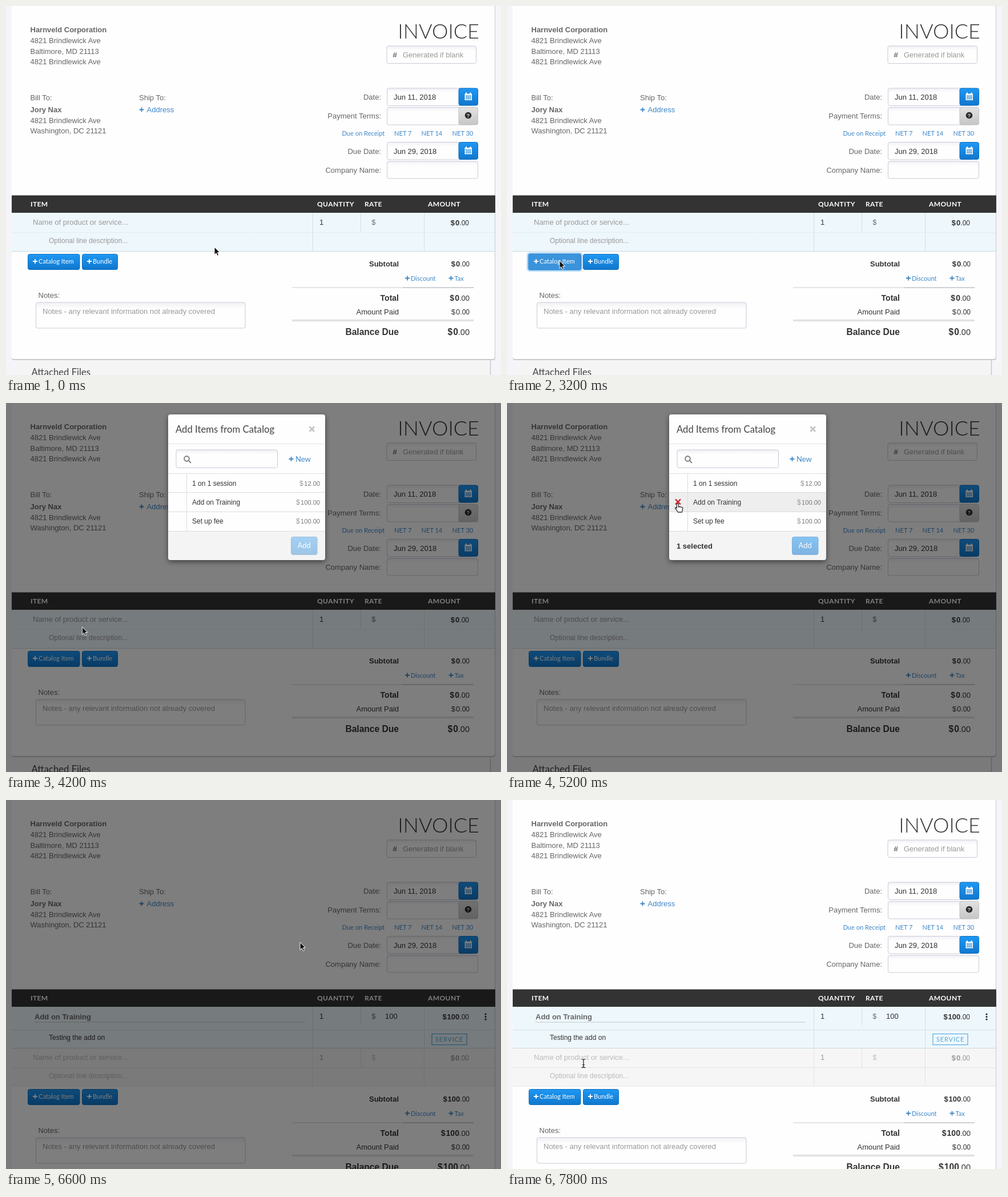
Recreate the animation shown at these times as an HTML page. Size 867 by 646 pixels, loop 8000 ms.

```html
<!DOCTYPE html>
<html lang="en">
<head>
<meta charset="utf-8">
<title>Invoice</title>
<style>
html, body { margin: 0; height: 100%; overflow: hidden; background: #f5f5f9; }
svg { display: block; width: 100%; height: 100%; }
text { font: 13px "Liberation Sans", Arial, sans-serif; fill: #666; white-space: pre; }
.lato, .link, .head, .title { font-family: Lato, sans-serif; }
.b { font-weight: 700; }
.s { font-size: 12px; }
.end { text-anchor: end; }
.dark { fill: #333; }
.hint { fill: #999; }
.faint { fill: #bbb; }
.link { font-size: 11.1px; fill: #3f87c9; }
.head { font-size: 12px; font-weight: 700; letter-spacing: .4px; fill: #fff; }
.title { font-size: 16.7px; fill: #444; }
.white { fill: #fff; }
.field { fill: url(#inset); stroke: #c9cbd8; }
.btn { fill: url(#blue); stroke: #0f70c0; }
.plus { fill: none; stroke: #3f87c9; stroke-width: 1.8; }
.onblue { stroke: #fff; }
.rule { fill: none; stroke: #d3e1e8; }
.grey { stroke: #e3e3e3; }

/* One frame lasts 200 ms, which is 2.5% of the loop. */
.before, .after, .lower, .backdrop, .modal, .foot, .loading, .loaded, .hover, .picked,
.enable, .focus, .cursor, .arrow, .beam, .hand, .spin {
  animation: 8s step-end -4ms infinite;
}
.before { animation-name: before; }
.after { animation-name: after; }
.lower { animation-name: lower; }
.backdrop { animation-name: backdrop; }
.modal { animation-name: modal; filter: drop-shadow(0 3px 5px rgba(0,0,0,.5)); }
.foot { animation-name: foot; }
.loading { animation-name: loading; }
.loaded { animation-name: loaded; }
.hover { animation-name: hover; }
.picked { animation-name: picked; }
.enable { animation-name: enable; }
.focus { animation-name: focus; }
.cursor { animation-name: cursor; }
.arrow { animation-name: arrow; }
.beam { animation-name: beam; }
.hand { animation-name: hand; }
.spin { animation: spin 1s steps(5) -4ms infinite; }

@keyframes before { 0% { opacity: 1 } 80%, 100% { opacity: 0 } }
@keyframes after { 0% { opacity: 0 } 80%, 100% { opacity: 1 } }
@keyframes lower { 0% { transform: none } 80%, 100% { transform: translateY(72px) } }
@keyframes backdrop { 0% { opacity: 0 } 42.5% { opacity: .5 } 85%, 100% { opacity: 0 } }
@keyframes modal {
  0% { opacity: 0; transform: translateY(-5px) }
  42.5% { opacity: 1; transform: translateY(-5px) }
  45% { opacity: 1; transform: none }
  80% { opacity: .4; transform: translateY(-25px) }
  82.5%, 100% { opacity: 0; transform: none }
}
@keyframes foot { 0% { transform: translateY(42px) } 50%, 100% { transform: none } }
@keyframes loading { 0% { opacity: 1 } 50%, 100% { opacity: 0 } }
@keyframes loaded { 0% { opacity: 0 } 50%, 100% { opacity: 1 } }
@keyframes hover { 0% { opacity: 0 } 62.5%, 100% { opacity: 1 } }
@keyframes picked { 0% { opacity: 0 } 65%, 100% { opacity: 1 } }
@keyframes enable { 0% { opacity: .38 } 65% { opacity: .52 } 67.5%, 100% { opacity: 1 } }
@keyframes focus { 0% { opacity: 0 } 40% { opacity: 1 } 42.5%, 100% { opacity: 0 } }
@keyframes cursor {
  0% { transform: translate(365px, 422px) }
  5% { transform: translate(365px, 422px); animation-timing-function: steps(6) }
  20% { transform: translate(99px, 389px) }
  22.5% { transform: translate(99px, 389px); animation-timing-function: steps(4) }
  32.5% { transform: translate(92px, 446px) }
  50% { transform: translate(92px, 446px); animation-timing-function: steps(5) }
  62.5% { transform: translate(299px, 176px) }
  65% { transform: translate(299px, 176px); animation-timing-function: steps(4) }
  75% { transform: translate(515px, 249px) }
  82.5% { transform: translate(515px, 249px); animation-timing-function: steps(5) }
  95%, 100% { transform: translate(134px, 461px) }
}
@keyframes arrow {
  0% { opacity: 1 } 10% { opacity: 0 } 27.5% { opacity: 1 }
  62.5% { opacity: 0 } 80% { opacity: 1 } 90%, 100% { opacity: 0 }
}
@keyframes beam { 0% { opacity: 0 } 10% { opacity: 1 } 27.5% { opacity: 0 } 90%, 100% { opacity: 1 } }
@keyframes hand { 0% { opacity: 0 } 62.5% { opacity: 1 } 80%, 100% { opacity: 0 } }
@keyframes spin { to { transform: rotate(360deg) } }
</style>
</head>
<body>
<svg viewBox="0 0 867 646">
<defs>
  <linearGradient id="blue" x2="0" y2="1"><stop stop-color="#1f98f4"/><stop offset="1" stop-color="#1077cd"/></linearGradient>
  <linearGradient id="silver" x2="0" y2="1"><stop stop-color="#e2e2e2"/><stop offset="1" stop-color="#c6c6c6"/></linearGradient>
  <linearGradient id="inset" x2="0" y2="1"><stop stop-color="#f1f1f6"/><stop offset=".25" stop-color="#fefefe"/></linearGradient>
  <filter id="glow" x="-20%" y="-40%" width="140%" height="180%"><feGaussianBlur stdDeviation="1.5"/></filter>
  <path id="plus" d="M0 0h8M4-4v8"/>
  <g id="calendar">
    <rect x="793" y=".5" width="33.5" height="30" rx="3" class="btn"/>
    <path d="M803.5 10h12.5v11.5h-12.5z" fill="#fff"/>
    <path d="M806 8v3M813.5 8v3" stroke="#fff" stroke-width="2"/>
    <path d="M804.500 13.500h10.500M804.500 16h10.500M804.500 18.500h10.500M807 13v8M810 13v8M813 13v8" stroke="#1684dc" stroke-width=".8"/>
  </g>
</defs>

<!-- Sheet and everything pushed down by a new item -->
<g class="lower">
  <path d="M19 600h829v60H19z" fill="#f5f5f6"/>
  <path d="M848.500 618v60" stroke="#c8c8cc" stroke-width="1.500"/>
  <text x="44.500" y="647" class="title">Attached Files</text>
  <rect x="10" y="-80" width="847" height="700" rx="4" fill="#c9c9cf"/>
  <rect x="10" y="-80" width="846" height="698" rx="4" fill="#fefefe"/>

  <rect class="focus" x="36" y="432.500" width="95" height="31" rx="4" fill="#4aa5ee" filter="url(#glow)"/>
  <rect x="38.500" y="434.500" width="90.500" height="27" rx="3" class="btn"/>
  <rect class="focus" x="38.500" y="434.500" width="90.500" height="27" rx="3" fill="#3b93db" stroke="#2d84cc"/>
  <use href="#plus" x="47" y="447" class="plus onblue"/>
  <text x="57" y="451" class="link white">Catalog Item</text>
  <rect x="133.500" y="434.500" width="62" height="27" rx="3" class="btn"/>
  <use href="#plus" x="142" y="447" class="plus onblue"/>
  <text x="152" y="451" class="link white">Bundle</text>

  <text x="56.500" y="511">Notes:</text>
  <rect x="52.500" y="519" width="366.500" height="45" rx="3" class="field"/>
  <text x="64" y="539" class="hint">Notes - any relevant information not already covered</text>

  <text x="688" y="455.500" class="b dark end">Subtotal</text>
  <use href="#plus" x="699" y="476.500" class="plus"/><text x="709" y="480.500" class="link">Discount</text>
  <use href="#plus" x="775.500" y="476.500" class="plus"/><text x="785.500" y="480.500" class="link">Tax</text>
  <path d="M501 493h194" stroke="#ddd" stroke-width="1.500"/>
  <path d="M695 493h124" stroke="#bfc0c6" stroke-width="1.500"/>
  <text x="688" y="516" class="b dark end" style="font-size:14px">Total</text>
  <text x="688" y="540" class="dark end">Amount Paid</text>
  <path d="M501 550.500h318" stroke="#e2e2e2" stroke-width="3.500"/>
  <text x="688" y="576" class="b dark end" style="font-size:15.600px">Balance Due</text>
  <text x="812" y="540" class="dark end">$<tspan dx="1">0</tspan><tspan class="s">.00</tspan></text>
  <g class="before">
    <text x="812" y="455.500" class="dark end"><tspan class="b">$</tspan><tspan class="b" dx="1">0</tspan><tspan class="s">.00</tspan></text>
    <text x="812" y="516" class="dark end" style="font-size:14px"><tspan class="b">$</tspan><tspan class="b" dx="1">0</tspan><tspan style="font-size:13px">.00</tspan></text>
    <text x="812" y="576" class="dark end" style="font-size:15.600px"><tspan class="b">$</tspan><tspan class="b" dx="1">0</tspan><tspan style="font-size:14.500px">.00</tspan></text>
  </g>
  <g class="after">
    <text x="812" y="455.500" class="dark end"><tspan class="b">$</tspan><tspan class="b" dx="1">100</tspan><tspan class="s">.00</tspan></text>
    <text x="812" y="516" class="dark end" style="font-size:14px"><tspan class="b">$</tspan><tspan class="b" dx="1">100</tspan><tspan style="font-size:13px">.00</tspan></text>
    <text x="812" y="576" class="dark end" style="font-size:15.600px"><tspan class="b">$</tspan><tspan class="b" dx="1">100</tspan><tspan style="font-size:14.500px">.00</tspan></text>
  </g>
</g>

<!-- Addresses -->
<text x="42.500" y="46" class="b">Harnveld Corporation</text>
<text x="42.500" y="65">4821 Brindlewick Ave</text>
<text x="42.500" y="83.500">Baltimore, MD 21113</text>
<text x="42.500" y="102">4821 Brindlewick Ave</text>
<text x="42.500" y="164.500">Bill To:</text>
<text x="42.500" y="186" class="b">Jory Nax</text>
<text x="42.500" y="204.500">4821 Brindlewick Ave</text>
<text x="42.500" y="223">Washington, DC 21121</text>
<text x="233" y="164.500">Ship To:</text>
<use href="#plus" x="233.500" y="181.500" class="plus"/>
<text x="246.500" y="186" style="fill:#3f87c9">Address</text>

<!-- Invoice fields -->
<text x="829" y="57" class="lato dark end" style="font-size:36px;font-weight:300">INVOICE</text>
<rect x="667" y="70" width="156.500" height="30.500" rx="3" class="field"/>
<text x="677.500" y="90" class="dark">#</text>
<text x="695" y="90" class="hint">Generated if blank</text>
<g class="end">
  <text x="657" y="164">Date:</text>
  <text x="657" y="197">Payment Terms:</text>
  <text x="657" y="258.500">Due Date:</text>
  <text x="657" y="291.500">Company Name:</text>
</g>
<rect x="667.500" y="144" width="150" height="30.500" rx="3" class="field"/>
<text x="679" y="164" class="dark">Jun 11, 2018</text>
<use href="#calendar" y="143.500"/>
<rect x="667.500" y="177.500" width="150" height="30.500" rx="3" class="field"/>
<rect x="793" y="177.500" width="33.500" height="30.500" rx="3" fill="url(#silver)" stroke="#c2c2c6"/>
<circle cx="809.500" cy="191.500" r="5.800" fill="#2b2b2b"/>
<text x="809.500" y="195" text-anchor="middle" class="b" style="font-size:9.500px;fill:#ddd">?</text>
<text x="588.500" y="227" class="link">Due on Receipt</text>
<text x="680" y="227" class="link">NET 7</text>
<text x="727.500" y="227" class="link">NET 14</text>
<text x="781.500" y="227" class="link">NET 30</text>
<rect x="667.500" y="238.500" width="150" height="30.500" rx="3" class="field"/>
<text x="679" y="258.500" class="dark">Jun 29, 2018</text>
<use href="#calendar" y="238"/>
<rect x="667.500" y="272" width="159" height="30" rx="3" class="field"/>

<!-- Item table -->
<path d="M10 331.500h847V362H10z" fill="#333"/>
<text x="43" y="351" class="head">ITEM</text>
<text x="545" y="351" class="head">QUANTITY</text>
<text x="628" y="351" class="head">RATE</text>
<text x="739" y="351" class="head">AMOUNT</text>
<g class="before">
  <path d="M10 362h846v67H10z" fill="#eef7fc"/>
  <path d="M10 396.500h846" class="rule" stroke-dasharray="1 1"/>
  <path d="M537.500 362v67M621.500 362v33M732.500 362v67" class="rule"/>
  <path d="M10 429.500h846" stroke="#c8d8e0"/>
  <text x="47" y="383" class="hint">Name of product or service...</text>
  <text x="75" y="415" class="hint s">Optional line description...</text>
  <text x="549" y="383" class="dark">1</text>
  <text x="640.500" y="383" class="s">$</text>
  <text x="811" y="384" class="dark end"><tspan class="b">$</tspan><tspan class="b" dx="1">0</tspan><tspan class="s">.00</tspan></text>
</g>
<g class="after">
  <path d="M10 362h846v72H10z" fill="#eef7fc"/>
  <path d="M10 435h846v66H10z" fill="#f6f6f6"/>
  <path d="M10 402.500h846M537.500 362v72M621.500 362v33M732.500 362v72" class="rule"/>
  <path d="M10 434.500h846" stroke="#c8d8e0"/>
  <path d="M10 468.500h846M10 501h846M537.500 435v66M621.500 435v33M732.500 435v66" class="rule grey"/>
  <text x="50" y="384" class="b">Add on Training</text>
  <path d="M50 389h473" stroke="#999" stroke-dasharray="1 1"/>
  <text x="75" y="420" class="dark s">Testing the add on</text>
  <text x="549" y="383" class="dark">1</text>
  <text x="640.500" y="383" class="s">$</text>
  <text x="664" y="383" class="dark">100</text>
  <text x="811" y="384" class="dark end"><tspan class="b">$</tspan><tspan class="b" dx="1">100</tspan><tspan class="s">.00</tspan></text>
  <path d="M840 375h.01M840 379.500h.01M840 384h.01" stroke="#222" stroke-width="3.200" stroke-linecap="round"/>
  <rect x="746" y="409.500" width="61" height="19" fill="none" stroke="#64b2e0" stroke-width="1.300"/>
  <text x="752" y="423" class="link" style="letter-spacing:.8px;fill:#55a8d8">SERVICE</text>
  <text x="47" y="455" class="faint">Name of product or service...</text>
  <text x="75" y="487" class="faint s">Optional line description...</text>
  <text x="549" y="455" class="hint">1</text>
  <text x="640.500" y="455" class="faint s">$</text>
  <text x="811" y="456" class="hint end"><tspan class="b">$</tspan><tspan class="b" dx="1">0</tspan><tspan class="s">.00</tspan></text>
</g>

<rect class="backdrop" width="867" height="646"/>

<!-- Catalog dialog -->
<g class="modal">
  <g class="foot">
    <rect x="284" y="62" width="275" height="213" rx="4" fill="#f4f4f5"/>
    <path d="M284 62h275v162H284z" fill="#fefefe"/>
    <path d="M284 224.500h275" stroke="#ddd"/>
    <g class="enable"><rect x="499.500" y="234.500" width="45.500" height="31" rx="3" class="btn"/></g>
    <text x="510.500" y="254" class="lato white">Add</text>
    <text x="297" y="254.500" class="b dark picked">1 selected</text>
  </g>
  <rect x="284" y="20" width="275" height="70" rx="4" fill="#fefefe"/>
  <path d="M284 71.500h275" stroke="#e3e3e3"/>
  <text x="297" y="51.500" class="title">Add Items from Catalog</text>
  <path d="M531.500 41.500l8.500 8.500m0-8.500l-8.500 8.500" stroke="#c2c2c2" stroke-width="2.600"/>
  <g class="loading" fill="none" stroke-width="2">
    <g transform="translate(421.500 168.500)"><g class="spin">
      <circle r="6.500" stroke="#ddd"/>
      <path d="M-4.600-4.600A6.500 6.500 0 0 1 6.500 0" stroke="#555"/>
      <path d="M6.500 0A6.500 6.500 0 0 1 4.600 4.600" stroke="#999"/>
    </g></g>
  </g>
  <g class="loaded">
    <rect x="298" y="82" width="177.500" height="31.500" rx="3" class="field"/>
    <g fill="none" stroke="#888" stroke-width="2.200"><circle cx="316.500" cy="97.500" r="4.300"/><path d="M319.500 100.500l4.500 4.500"/></g>
    <use href="#plus" x="495.500" y="98" class="plus"/>
    <text x="507" y="102.500" class="link" style="font-size:13px">New</text>
    <path d="M284 157h275v33H284z" fill="#eee" class="hover"/>
    <path d="M284 123.500h275M284 156.500h275M284 190.500h275M316.500 124v100" stroke="#ddd"/>
    <g class="s">
      <text x="326" y="144.500" class="dark s">1 on 1 session</text>
      <text x="326" y="178" class="dark s">Add on Training</text>
      <text x="326" y="211" class="dark s">Set up fee</text>
      <text x="550" y="144.500" class="hint end s">$<tspan dx="1.500" style="font-size:11.100px;fill:#777">12.00</tspan></text>
      <text x="550" y="178" class="hint end s">$<tspan dx="1.500" style="font-size:11.100px;fill:#777">100.00</tspan></text>
      <text x="550" y="211" class="hint end s">$<tspan dx="1.500" style="font-size:11.100px;fill:#777">100.00</tspan></text>
    </g>
    <path class="picked" d="M295 168.500l9 9m0-9l-9 9" stroke="#cc1f2a" stroke-width="2.300"/>
  </g>
</g>

<g class="cursor">
  <path class="arrow" d="M0 0V13.500L3.100 10.600 5.300 15.300 7.600 14.200 5.400 9.600H9.600Z" fill="#111" stroke="#fff" stroke-width="1"/>
  <g class="beam" fill="none">
    <path id="bar" d="M-3.500-7.500Q0-7.500 0-5.500V5.500Q0 7.500-3.500 7.500M3.500-7.500Q0-7.500 0-5.500M3.500 7.500Q0 7.500 0 5.500M-2 2.500h4" stroke="#fff" stroke-width="2.600"/>
    <path d="M-3.500-7.500Q0-7.500 0-5.500V5.500Q0 7.500-3.500 7.500M3.500-7.500Q0-7.500 0-5.500M3.500 7.500Q0 7.500 0 5.500M-2 2.500h4" stroke="#111" stroke-width="1.200"/>
  </g>
  <path class="hand" d="M-1.600 8V1.300a1.500 1.500 0 0 1 3 0V6c.8-1 2.400-.8 2.700.2.800-.8 2.200-.5 2.500.5 1-.5 2.200 0 2.200 1.400 0 3-.6 4-1.500 7H.4C-.8 12.500-3 10.600-4.300 8.600c-.7-1.300 1-2.200 2.700-.6z" fill="#fff" stroke="#111" stroke-width="1.100"/>
</g>
</svg>
</body>
</html>
```
